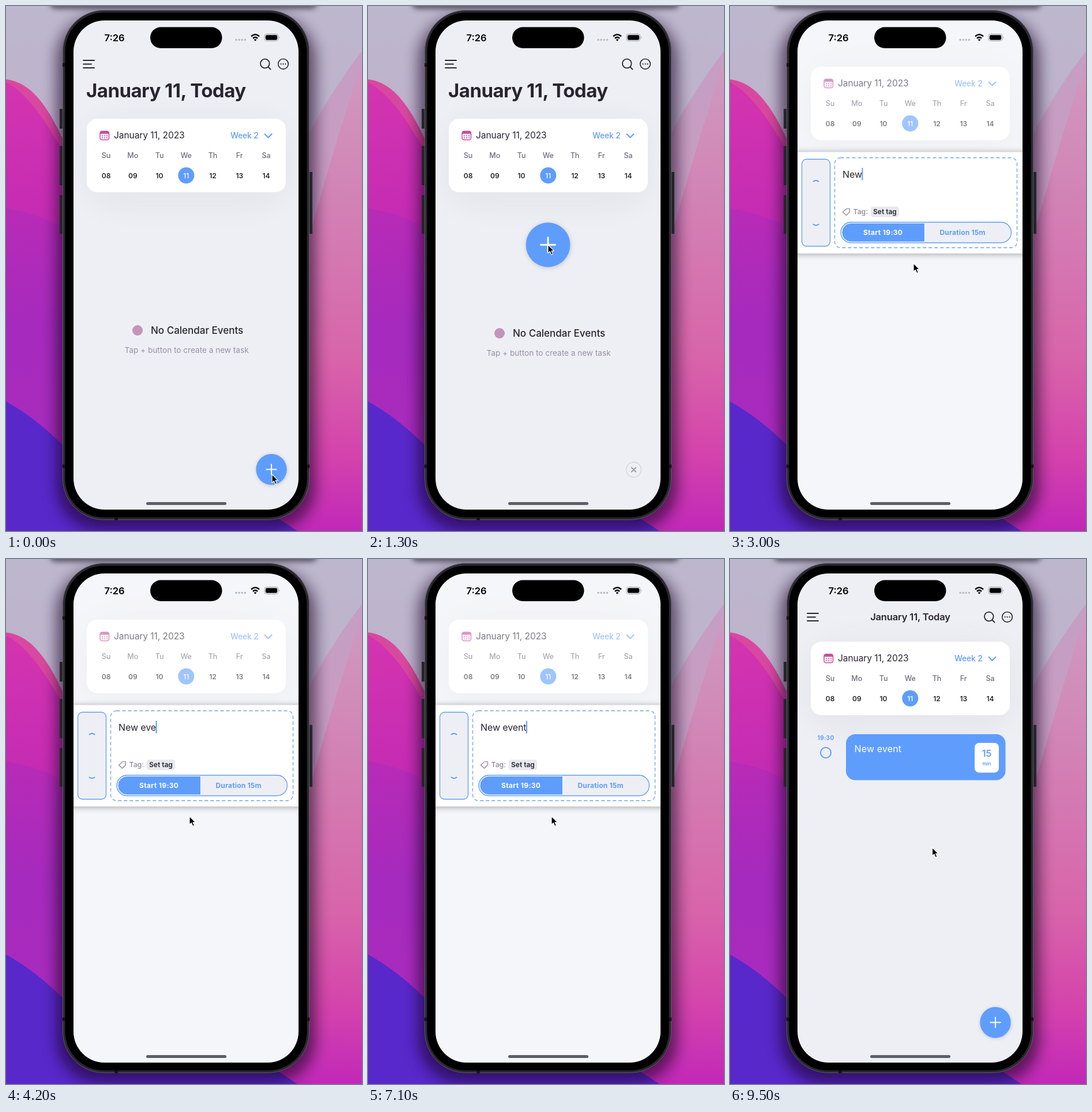
These frames come from a looping animation (617 by 908 pixels, 9600 ms). An HTML page:

```html
<!DOCTYPE html>
<html lang="en">
<head>
<meta charset="utf-8">
<title>New event</title>
<style>
  html, body { margin: 0; width: 100%; height: 100%; overflow: hidden; }
  svg { display: block; width: 617px; height: 908px; }
  text { font: 400 16px Inter, sans-serif; font-optical-sizing: none; fill: #29242f; white-space: pre; }
  .mid { text-anchor: middle; }
  .line { fill: none; stroke: #29242f; stroke-width: 1.8; stroke-linecap: round; stroke-linejoin: round; }
  .blue { fill: #5f9dfd; }
  .blueLine { fill: none; stroke: #5f9dfd; stroke-linecap: round; stroke-linejoin: round; }
  .white { fill: #fff; }
</style>
</head>
<body>
<svg viewBox="0 0 617 908">
  <defs>
    <linearGradient id="sky" x2="0" y2="1">
      <stop stop-color="#bdb7cd"/><stop offset=".3" stop-color="#bfb0cb"/><stop offset="1" stop-color="#c8a4c4"/>
    </linearGradient>
    <linearGradient id="rose" gradientUnits="userSpaceOnUse" x1="0" y1="80" x2="0" y2="908">
      <stop stop-color="#cf9cc2"/><stop offset=".3" stop-color="#d283b5"/><stop offset=".64" stop-color="#d864aa"/>
      <stop offset=".84" stop-color="#d443ac"/><stop offset="1" stop-color="#c128b8"/>
    </linearGradient>
    <linearGradient id="magenta" gradientUnits="userSpaceOnUse" x1="0" y1="130" x2="30" y2="390">
      <stop stop-color="#d434af"/><stop offset="1" stop-color="#c32bb4"/>
    </linearGradient>
    <linearGradient id="purple" gradientUnits="userSpaceOnUse" x1="0" y1="350" x2="20" y2="760">
      <stop stop-color="#b82bb6"/><stop offset=".5" stop-color="#a52abd"/><stop offset="1" stop-color="#a92bbd"/>
    </linearGradient>
    <filter id="soft" x="-50%" y="-50%" width="200%" height="200%"><feGaussianBlur stdDeviation="12"/></filter>
    <filter id="halo" x="-50%" y="-50%" width="200%" height="200%"><feGaussianBlur stdDeviation="18"/></filter>
    <filter id="fine" x="-50%" y="-50%" width="200%" height="200%"><feGaussianBlur stdDeviation="3"/></filter>
    <filter id="medium" x="-50%" y="-100%" width="200%" height="300%"><feGaussianBlur stdDeviation="5"/></filter>
    <clipPath id="screen"><rect x="117" y="25" width="390" height="846" rx="54"/></clipPath>
  </defs>

  <!-- wallpaper -->
  <rect width="617" height="908" fill="url(#sky)"/>
  <path d="M617 78Q565 145 520 230V908H617Z" fill="#cb94bf" opacity=".7"/>
  <path d="M617 98Q570 235 520 420L460 800V908H617Z" fill="url(#rose)"/>
  <path d="M0 127C44 132 74 172 110 256V500H0Z" fill="#d9489f"/>
  <path d="M0 132C35 150 68 194 110 272V908H0Z" fill="url(#magenta)"/>
  <path d="M0 350Q55 358 110 388V908H0Z" fill="url(#purple)"/>
  <path d="M0 684Q53 713 105 766L300 840L470 885L505 908H0Z" fill="#5928cb"/>
  <rect x="76" y="-16" width="463" height="21" rx="10" fill="#4b4755" opacity=".85" filter="url(#medium)"/>

  <!-- phone -->
  <rect x="87" y="18" width="450" height="888" rx="74" fill="#180624" opacity=".58" filter="url(#soft)"/>
  <path d="M93 178h6v34h-6zM93 242h6v68h-6zM93 327h6v67h-6zM525 287h6v107h-6z" fill="#26252b"/>
  <rect x="98.500" y="7.500" width="427" height="881" rx="71" fill="#29292e" stroke="#5c5b63"/>
  <path d="M98 99h5v6h-5zM98 793h5v6h-5zM521 793h5v6h-5zM188 884h6v5h-6z" fill="#141417"/>
  <rect x="102.500" y="11.500" width="419" height="873" rx="67"/>

  <g clip-path="url(#screen)">
    <rect x="117" y="25" width="390" height="846" fill="#eeeff4"/>

    <g id="calendar">
      <rect x="130" y="190" width="365" height="165" rx="65" fill="#dcdde4" opacity=".4" filter="url(#halo)"/>
      <rect x="140" y="195" width="345" height="127" rx="18" class="white"/>
      <rect x="163" y="216.500" width="15.500" height="15" rx="3.500" fill="#fbeff7" stroke="#c84f9d" stroke-width="1.500"/>
      <path d="M163 221v-1q0-3.500 3.500-3.500h8.500q3.500 0 3.500 3.500v1z" fill="#c84f9d"/>
      <path d="M166 224.500h10M166 228h10" stroke="#c84f9d" stroke-width="1.700" stroke-dasharray="2 2"/>
      <text x="187" y="229" style="font-size:15.500px;letter-spacing:-.05px">January 11, 2023</text>
      <text x="389" y="228.500" class="blue" style="font-size:13.800px;font-weight:500;letter-spacing:-.1px">Week 2</text>
      <path d="M448.500 221.500l6 6 6-6" class="blueLine" stroke-width="2"/>
      <circle cx="312.300" cy="293" r="14" class="blue"/>
      <g id="days"></g>
    </g>

    <g id="empty">
      <circle cx="228" cy="561" r="9" fill="#c394b9"/>
      <text x="251" y="567" style="font-size:17px;font-weight:500">No Calendar Events</text>
      <text x="205.500" y="600" style="font-size:13.600px;fill:#9a8ea8">Tap + button to create a new task</text>
    </g>

    <g id="event">
      <text x="166" y="313" class="mid blue" style="font-size:10px;font-weight:700;letter-spacing:.3px">19:30</text>
      <circle cx="166" cy="335" r="9" class="blueLine" stroke-width="2"/>
      <rect x="201" y="303" width="276.500" height="79.500" rx="16" class="blue"/>
      <text x="215.500" y="334" class="white" style="letter-spacing:.15px">New event</text>
      <rect x="424" y="318" width="42" height="51.500" rx="8" class="white"/>
      <text x="445" y="342" class="mid blue" style="font-weight:600">15</text>
      <text x="445" y="357" class="mid blue" style="font-size:8.500px;font-weight:600">min</text>
    </g>

    <rect id="veilTop" x="117" y="25" width="390" class="white"/>
    <rect id="veilLow" x="117" y="428" width="390" height="450" class="white"/>

    <g id="editor">
      <rect id="editorShadow" x="95" y="252" width="434" height="179" fill="#777882" filter="url(#medium)"/>
      <rect x="117" y="252.500" width="390" height="175.500" class="white"/>
      <rect x="124.500" y="265" width="49" height="150.500" rx="8" fill="#eeeff4" stroke="#5f9dfd" stroke-width="1.300"/>
      <path d="M144.500 303.500q4.500-3.500 9 0M144.500 377.500q4.500 3.500 9 0" class="blueLine" stroke-width="2"/>
      <rect x="181.500" y="262.500" width="316" height="155.500" rx="10" fill="none" stroke="#749fe8" stroke-width="1.300" stroke-dasharray="6 4"/>
      <text id="placeholder" x="197.500" y="298" style="font-size:17px;letter-spacing:-.15px;fill:#a69db2">New Event</text>
      <text id="typed" x="195" y="297" style="letter-spacing:-.1px"></text>
      <rect id="caret" y="280" width="2" height="21.500" class="blue"/>
      <path d="M202 350.500h5.500v5.500l-6 6-6-5.500zM205 353h.1" class="line" style="stroke:#8d869b;stroke-width:1.200"/>
      <text x="213.500" y="360" style="font-size:12.300px;font-weight:500;fill:#8d869b">Tag:</text>
      <rect x="244" y="347" width="49" height="18" rx="4.500" fill="#e8e9ef"/>
      <text x="248" y="360" style="font-size:12px;font-weight:600">Set tag</text>
      <rect x="192" y="374" width="295.500" height="35.500" rx="17.700" fill="#eeeff4" stroke="#5f9dfd" stroke-width="1.300"/>
      <path d="M337.500 375.500v32.500H210a16.250 16.250 0 0 1 0-32.500z" class="blue" stroke="#fff"/>
      <text x="231" y="396" class="white" style="font-size:12px;font-weight:700;letter-spacing:.35px">Start 19:30</text>
      <text x="363.500" y="396" class="blue" style="font-size:12px;font-weight:700;letter-spacing:.2px">Duration 15m</text>
    </g>

    <text id="bigTitle" x="139" y="158" style="font-size:33px;font-weight:700;letter-spacing:-.53px">January 11, Today</text>
    <text id="smallTitle" x="312.500" y="106" class="mid" style="font-size:16.500px;font-weight:600;letter-spacing:-.15px">January 11, Today</text>
    <g id="toolbar" class="line">
      <path d="M134 94h19M134 100.500h14M134 107h19M454.500 105.500l4 4"/>
      <circle cx="448.800" cy="99.500" r="7.800"/>
      <circle cx="480.500" cy="100.300" r="8.800" stroke-width="1.600"/>
      <path d="M476.500 100.300h.1M480.500 100.300h.1M484.500 100.300h.1" stroke-width="2.200"/>
    </g>

    <g id="close">
      <circle cx="460.500" cy="802" r="13" fill="#eeeff4" stroke="#d8d5dd" stroke-width="1.500"/>
      <path d="M456.800 798.300l7.400 7.400M464.200 798.300l-7.400 7.400" class="line" style="stroke:#928a9f"/>
    </g>
    <g id="disabled" class="white">
      <circle cx="460" cy="801.500" r="27" fill="#e5e6e9"/>
      <path d="M451 801.500h18M460 792.500v18" stroke="#f3f3f6" stroke-width="2"/>
    </g>
    <g id="add">
      <circle cy="1" cx=".5" r="26.500" fill="#8a8f9c" opacity=".45" filter="url(#fine)"/>
      <circle r="26.700" class="blue"/>
      <path d="M-8.700 0h17.400M0-8.700v17.400" stroke="#fff" stroke-width="2" stroke-linecap="round"/>
    </g>

    <!-- status bar -->
    <text x="170.500" y="60.500" style="font-size:16.500px;font-weight:600;fill:#000">7:26</text>
    <rect x="250" y="36.500" width="124.500" height="36.500" rx="18.200"/>
    <path d="M399 58.500h.1M404.100 58.500h.1M409.200 58.500h.1M414.300 58.500h.1" class="line" style="stroke:#bdb8c5;stroke-width:3.600"/>
    <path d="M425 52.500q7-6.500 14 0M428 56q4-3.700 8 0" fill="none" stroke="#000" stroke-width="2.500"/>
    <path d="M429.700 58.300q2.300-2 4.600 0L432 60.700z"/>
    <rect x="448" y="48.500" width="24" height="12" rx="3.800" fill="none" stroke="#a09ba8"/>
    <rect x="449.800" y="50.300" width="20.400" height="8.400" rx="2.400"/>
    <path d="M473.500 52.700q2 1.800 0 3.600z" fill="#a09ba8"/>
    <rect x="243" y="858" width="139" height="5" rx="2.500" fill="#5f5e63"/>
  </g>

  <path id="pointer" d="M0 0V14.500L3.400 11.500L5.700 17L8.300 15.900L6 10.600H10.500Z" stroke="#fff" stroke-width="1.100" stroke-linejoin="round"/>
</svg>

<script>
const LOOP = 9600, STEP = 100;
const PHRASE = "New event", TYPE_START = 2300, TYPE_EVERY = 300;
const el = id => document.getElementById(id);
const show = (id, opacity) => el(id).setAttribute("opacity", opacity);
const place = (id, x, y, more = "") => el(id).setAttribute("transform", `translate(${x} ${y}) ${more}`);
const mix = (a, b, k) => a + (b - a) * k;

// Eased progress from 0 to 1 between two times.
function ease(t, from, to) {
  const k = Math.min(1, Math.max(0, (t - from) / (to - from)));
  return k < .5 ? 2 * k * k : 1 - 2 * (1 - k) ** 2;
}

el("days").innerHTML = ["Su", "Mo", "Tu", "We", "Th", "Fr", "Sa"].map((day, i) => {
  const x = 173.6 + i * 46.23, today = i === 3;
  const label = (y, size, weight, color, str) =>
    `<text x="${x}" y="${y}" class="mid" style="font-size:${size}px;font-weight:${weight};fill:${color}">${str}</text>`;
  return label(263, 12.5, 500, "#726a80", day) +
    label(297.5, 12, today ? 500 : 600, today ? "#fff" : "#29242f", String(8 + i).padStart(2, "0"));
}).join("");

// Pointer stops: time, x, y.
const stops = [[400, 461, 810], [1200, 312, 413], [1400, 312, 413], [1700, 316, 436],
  [1900, 318, 445], [7500, 318, 445], [8200, 350.5, 499]];

function pointerAt(t) {
  let [, x, y] = stops[0];
  for (let i = 1; i < stops.length; i++) {
    const k = ease(t, stops[i - 1][0], stops[i][0]);
    x = mix(x, stops[i][1], k);
    y = mix(y, stops[i][2], k);
  }
  return [x, y];
}

function draw(t) {
  const drag = ease(t, 400, 1200), open = ease(t, 1400, 1700);
  const settle = ease(t, 8470, 9000), fade = ease(t, 8600, 9000);
  const lower = 38 * settle, editing = open * (1 - fade);

  place("pointer", ...pointerAt(t));
  place("calendar", 0, -90 * open + lower);
  place("empty", 0, 5 * drag);
  show("empty", 1 - open);
  place("bigTitle", 0, -90 * open);
  show("bigTitle", 1 - open);
  show("smallTitle", fade);
  show("toolbar", 1 - open + fade);
  show("event", fade);

  show("veilTop", .4 * editing);
  el("veilTop").setAttribute("height", 227.5 + lower);
  show("veilLow", .4 * open * (1 - ease(t, 8450, 8600)));
  place("editor", 0, lower + 340 * (1 - open), `scale(1 ${open})`);
  show("editor", editing);
  show("editorShadow", .5 * (1 - ease(t, 8450, 8600)));

  const count = t < TYPE_START ? 0 : Math.floor((t - TYPE_START) / TYPE_EVERY) + 1;
  const cleared = t >= 8500;
  el("typed").textContent = cleared ? "" : PHRASE.slice(0, count);
  show("placeholder", count || cleared ? 0 : 1);
  show("caret", cleared ? 0 : 1);
  el("caret").setAttribute("x", count ? 194.5 + el("typed").getComputedTextLength() : 193.5);

  const grow = 1 + .44 * ease(t, 400, 700);
  if (t < 8500) place("add", mix(460, 312, drag), mix(801.5, 413, drag), `scale(${grow})`);
  else place("add", 460, 801.5);
  show("add", t < 8500 ? 1 - ease(t, 1400, 1600) : fade);
  show("disabled", t < 8500 ? 0 : ease(t, 8450, 8600) * (1 - fade));
  show("close", ease(t, 500, 800) * (1 - ease(t, 1400, 1600)));
}

const start = performance.now();
function tick() {
  const t = (performance.now() - start) % LOOP;
  draw(Math.floor(t / STEP) * STEP);
  requestAnimationFrame(tick);
}
tick();
</script>
</body>
</html>
```
